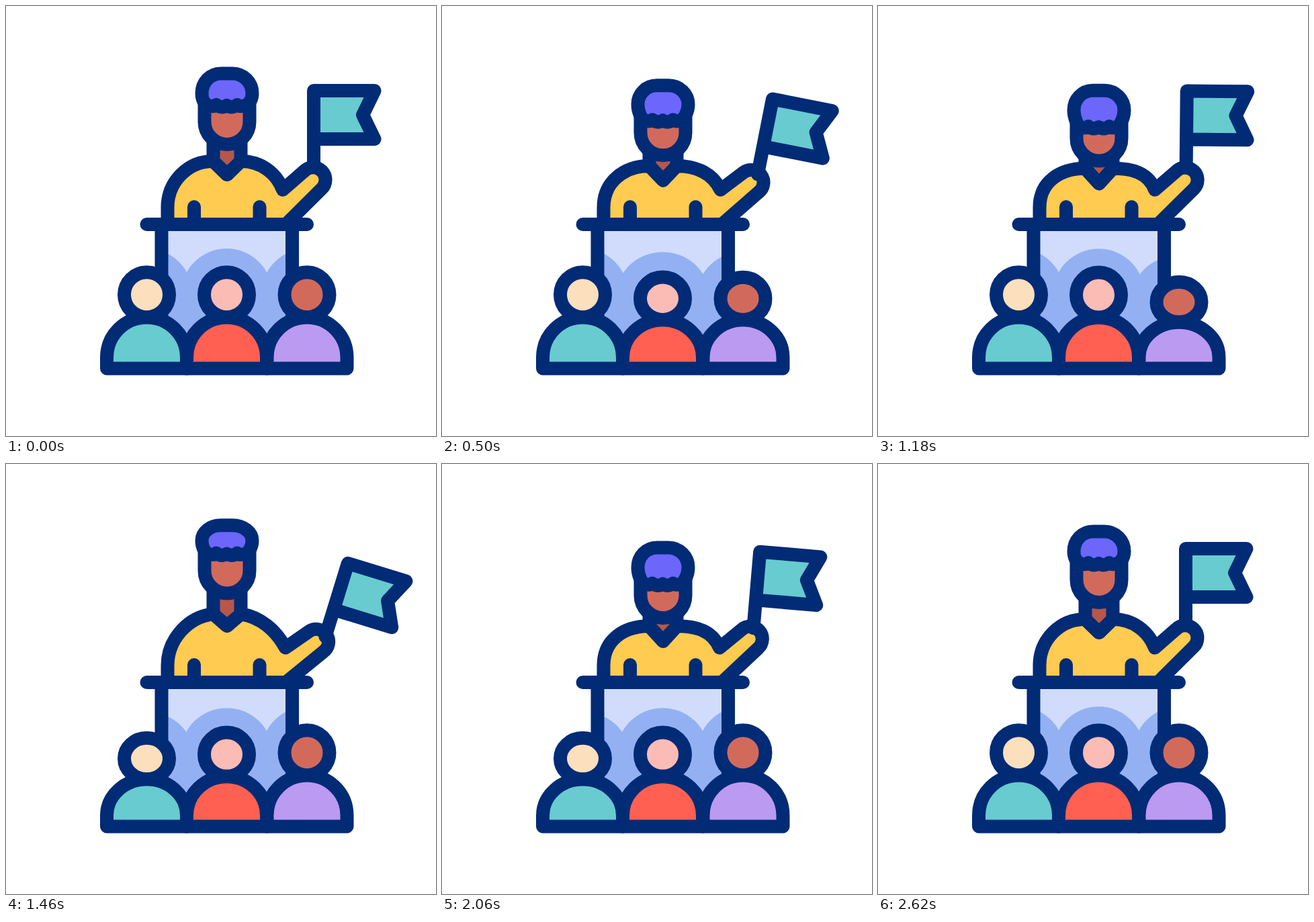
These frames come from a looping animation (640x640 px, 2.82 s). An HTML page:

```html
<!DOCTYPE html>
<html lang="en">
<head>
<meta charset="utf-8">
<title>Speaker with audience</title>
<style>
  html, body { margin: 0; width: 100%; height: 100%; overflow: hidden; background: #fff; }
  svg { display: block; width: 100%; height: 100%; }
  .line { stroke: #022b76; stroke-width: 20; stroke-linejoin: round; stroke-linecap: round; }
</style>
</head>
<body>
<svg id="stage" viewBox="0 0 640 640"></svg>
<script>
const LOOP = 2820;
const stage = document.getElementById('stage');

function add(tag, attrs, parent = stage) {
  const el = document.createElementNS('http://www.w3.org/2000/svg', tag);
  set(el, attrs);
  parent.appendChild(el);
  return el;
}
function set(el, attrs) {
  for (const key in attrs) el.setAttribute(key, attrs[key]);
}
const shape = (fill, attrs = {}) => add('path', { class: 'line', fill, ...attrs });
const plain = (fill, attrs = {}) => add('path', { fill, ...attrs });

// Speaker
const torso = shape('#ffcb50', { 'stroke-linecap': 'butt' });
const neckSkin = plain('#b7574a');
const neck = shape('none');
const face = shape('#d26a5b');
const hair = shape('#6c66fa');
shape('none', { d: 'M280 325V299M377.5 325V299' });
const flag = shape('#67cbd0', { d: 'M458 240V126H548.5L531 162L548.5 198H458' });

// Podium
plain('#d1dcfc', { d: 'M231.5 325H426V520H231.5Z' });
const clip = add('clipPath', { id: 'panel' });
add('rect', { x: 231.5, y: 325, width: 194.5, height: 195 }, clip);
const shade = add('g', { 'clip-path': 'url(#panel)', fill: '#93b1f2' });
add('rect', { x: 231.5, y: 425, width: 194.5, height: 95 }, shade);

// Audience
const people = [
  { x: 209.5, skin: '#fcdfbc', shirt: '#67cbd0', delay: 0 },
  { x: 328.5, skin: '#fcbcb6', shirt: '#ff6051', delay: 200 },
  { x: 448, skin: '#d26a5b', shirt: '#bb9af1', delay: 400 }
];
for (const p of people) p.hump = add('ellipse', { cx: p.x, cy: 429, rx: 68 }, shade);
shape('none', { d: 'M231.5 325V470M426 325V470M209.5 325H448' });
for (const p of people) {
  p.head = add('ellipse', { class: 'line', fill: p.skin, cx: p.x, rx: 33.5 });
  p.body = shape(p.shirt);
}

const ease = u => u * u * (3 - 2 * u);

// One rise and fall of 400 ms, repeated
function pulse(t, period, count) {
  if (t < 0 || t >= period * count) return 0;
  const u = (t % period) / 200;
  return u < 1 ? ease(u) : u < 2 ? ease(2 - u) : 0;
}

// Speaker poses, 400 ms apart: rest, low, high
const POSES = 'RLHLHLR';

function drawSpeaker(t) {
  const i = Math.min(Math.floor(t / 400), POSES.length - 2);
  const k = ease(Math.min(t / 400 - i, 1));
  const weight = c => (POSES[i] === c) * (1 - k) + (POSES[i + 1] === c) * k;
  const low = weight('L'), high = weight('H');
  const at = (y, down, up) => y + low * down - high * up;

  const top = at(100.5, 25.5, 22.5);
  const side = at(130, 25.5, 32);
  const fringe = at(149, 32.5, 32.5);
  const chin = at(172.5, 24.8, 28.3);
  const join = at(231, 11, 15);
  const slope = at(231, 11, 9);
  const tip = at(251, 13.6, 19.1);

  const bend = 0.55 * (side - top);
  set(hair, { d: `M320 ${top}H337C353.5 ${top} 366.5 ${side - bend} 366.5 ${side}` +
    `C366.5 ${side + 10} 361 ${fringe - 1} 352 ${fringe}Q347 ${fringe + 1} 344 ${fringe - 2}` +
    `Q336.5 ${fringe + 4} 328.5 ${fringe - 1}Q320.5 ${fringe + 4} 313 ${fringe - 2}` +
    `Q310 ${fringe + 1} 305 ${fringe}C296 ${fringe - 1} 291.5 ${side + 10} 291.5 ${side}` +
    `C291.5 ${side - bend} 303.5 ${top} 320 ${top}Z` });
  set(face, { d: `M295.5 ${side + 14}V${chin}A33.5 33.5 0 0 0 362.5 ${chin}V${side + 14}` });
  const collar = `V${join}L329 ${tip}L349.5 ${join}V${chin}`;
  set(neckSkin, { d: `M308.5 ${chin}${collar}Z` });
  set(neck, { d: `M308.5 ${chin}${collar}` });

  // Arm and flag swing
  const swing = pulse(t, 400, 6);
  const hx = 457 + 6 * swing, hy = 258.7 + 7.3 * swing;
  const a = (45 - 14 * swing) * Math.PI / 180;
  const dx = 18.5 * Math.sin(a), dy = 18.5 * Math.cos(a);
  set(torso, { d: `M240.5 325V300C240.5 262 270 ${slope} 308.5 ${join}L329 ${tip}L349.5 ${join}` +
    `C379 ${slope} 402 248 ${412 + 5 * swing} 273.5L${hx - dx} ${hy - dy}` +
    `A18.5 18.5 0 0 1 ${hx + dx} ${hy + dy}L416.5 325` });
  set(flag, { transform: `rotate(${22 * swing} 411 306)` });
}

function drawPerson(p, t) {
  const d = 15 * pulse(t - p.delay, 600, 4);
  const r = 59.5 - d / 2;
  set(p.hump, { ry: 68 - 0.7 * d });
  set(p.head, { cy: 429.7 + 0.75 * d, ry: 33.5 - 0.25 * d });
  set(p.body, { d: `M${p.x - 59.5} 539.5V523A59.5 ${r} 0 0 1 ${p.x + 59.5} 523V539.5Z` });
}

const start = performance.now();
function tick() {
  const t = (performance.now() - start) % LOOP;
  drawSpeaker(t);
  for (const p of people) drawPerson(p, t);
  requestAnimationFrame(tick);
}
tick();
</script>
</body>
</html>
```
